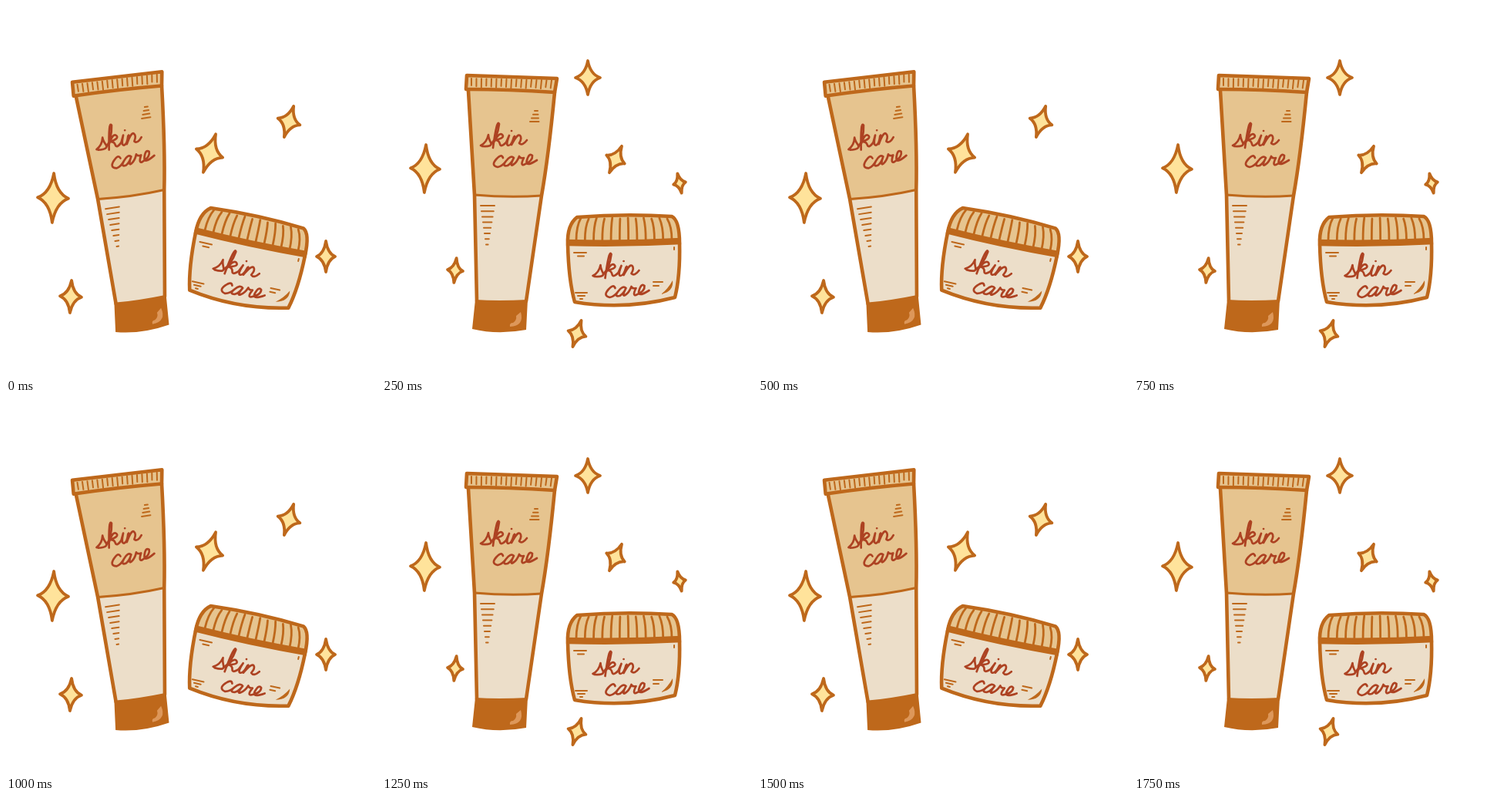
Recreate the animation shown at these times as an HTML page. Size 480 by 480 pixels, loop 2 s.

```html
<!DOCTYPE html>
<html lang="en">
<head>
<meta charset="utf-8">
<title>Skin care</title>
<style>
  html, body { margin: 0; width: 100%; height: 100%; overflow: hidden; background: #fff; }
  svg { display: block; width: 100%; height: 100%; }
  path { stroke-linecap: round; stroke-linejoin: round; }
  .tan { fill: #e6c48f; }
  .cream { fill: #ecdec9; }
  .cap { fill: #be681b; }
  .shine { fill: #dd975a; }
  .line { fill: none; stroke: #be681b; stroke-width: 4.6; }
  .thin { fill: none; stroke: #be681b; stroke-width: 2; }
  .ink { fill: none; stroke: #ad4222; stroke-width: 2.7; }
  .star { fill: #ffe39b; stroke: #be681b; stroke-width: 3.8; }
</style>
</head>
<body>
<svg viewBox="0 0 480 480">
  <defs>
    <!-- hand-lettered "skin care" -->
    <g id="label" class="ink" role="img" aria-label="skin care">
      <path d="M128 181Q136 177 138 167Q138 171 141 177T130 182
        M141 180Q150 170 152 153Q149 146 144 184M145 177Q152 163 156 167T147 174Q152 174 153 179T161 177
        L165 168Q160 181 164 181T171 170M168 162h.1M172 169L168 180Q176 165 179 168T178 178Q182 182 188 174"/>
      <path d="M157 197Q155 191 148 199T150 209Q156 208 161 201
        M171 197Q167 193 161 201T163 207Q168 204 171 197Q165 209 170 206T178 195
        Q179 198 184 197Q179 207 184 206Q196 201 195 194Q191 190 188 200T201 200"/>
    </g>
  </defs>

  <g id="tube">
    <path class="cream" d="M120 245L123 384H187L207 246Z"/>
    <path class="tan" d="M110 90L227 94L224 113L207 247H120L112 110Z"/>
    <path class="line" d="M109 108L110 90Q170 92 227 94L224 112Q216 195 207 246Q196 320 187 383M112 110L120 245L123 383"/>
    <path class="line" d="M110 108Q165 108 224 112"/>
    <path class="thin" style="stroke-width:3" d="M120 245Q165 249 207 246"/>
    <path id="crimp" class="thin"/>
    <path id="tubeMarks" class="thin"/>
    <path class="cap" d="M121 381Q150 383 189 381L187 420Q150 427 117 419Z"/>
    <path class="shine" d="M180 397Q185 415 166 416Q165 411 170 411Q175 408 174 402Z"/>
    <use href="#label"/>
  </g>

  <g id="jar">
    <path class="cream" d="M241 309Q242 355 250 384Q315 395 380 378Q387 350 386 308Z"/>
    <path class="tan" d="M241 306Q240 284 253 274Q315 269 376 273Q386 278 386 305Z"/>
    <path id="ridges" class="thin" style="stroke-width:2.8"/>
    <path class="line" d="M241 309Q240 284 253 274Q315 269 376 273Q386 278 386 308Q387 350 380 378Q315 395 250 384Q242 355 241 309"/>
    <path class="line" style="stroke-width:8.5;stroke-linecap:butt" d="M239 307Q315 309 388 305"/>
    <path id="jarMarks" class="thin"/>
    <path class="cap" d="M377 356Q379 370 362 374Q371 367 377 356Z"/>
    <use href="#label" x="145.5" y="169"/>
  </g>

  <g id="stars"></g>
</svg>
<script>
const $ = id => document.getElementById(id);
const strokes = (n, f) => Array.from({ length: n }, (_, i) => f(i)).join('');

// Stacked dashes whose start and width change evenly from row to row.
const hatch = (x, y, rows, width, shift, grow, gap) =>
  strokes(rows, i => `M${x + i * shift} ${y + i * gap}h${width + i * grow}`);

// Four-pointed star with concave sides.
function star(x, y, w, h, tilt) {
  const a = w * 0.2, b = h * 0.2;
  return `<path class="star" transform="translate(${x} ${y}) rotate(${tilt})"
    d="M0 ${-h}Q${a} ${-b} ${w} 0Q${a} ${b} 0 ${h}Q${-a} ${b} ${-w} 0Q${-a} ${-b} 0 ${-h}Z"/>`;
}

$('crimp').setAttribute('d', strokes(17, i =>
  `M${116 + i * 6.5} ${94 + i * 0.15}l${-i * 0.08} ${9 + i % 3}`));
$('ridges').setAttribute('d', strokes(12, i => {
  const u = i / 5.5 - 1, top = 314 + u * 56, end = 314 + u * 62;
  return `M${top} ${275 + i % 2}Q${end} 286 ${end} 304`;
}));
$('tubeMarks').setAttribute('d',
  hatch(128, 259, 8, 18, 1, -2.2, 7.2) + hatch(198, 136, 4, 4, -2, 2.5, 4.7));
$('jarMarks').setAttribute('d',
  hatch(249, 320, 2, 16, 5, -8, 4.5) + hatch(251, 372, 3, 15, 3, -6, 4) +
  hatch(352, 358, 2, 12, 0, -5, 5) + 'M379 313v3');

const poses = [
  {
    tube: 'translate(-36.2 26.2) rotate(-8.6)',
    jar: 'translate(-4.5 0) rotate(12.8 314.75 344)',
    stars: star(61, 249, 20, 32, 2) + star(84, 377, 14, 21, 3) + star(264, 191, 18, 26, 18) +
      star(367, 150, 15, 21, 17) + star(415, 325, 12, 20, 0)
  },
  {
    tube: '',
    jar: '',
    stars: star(56, 211, 19, 31, 2) + star(95, 343, 10, 16, 6) + star(267, 93, 16, 22, 0) +
      star(303, 199, 13, 19, 25) + star(386, 230, 8, 13, -12) + star(253, 425, 12, 18, 18)
  }
];

let shown;
function draw() {
  const pose = poses[Math.floor(performance.now() / 250) % 2];
  if (pose !== shown) {
    shown = pose;
    $('tube').setAttribute('transform', pose.tube);
    $('jar').setAttribute('transform', pose.jar);
    $('stars').innerHTML = pose.stars;
  }
  requestAnimationFrame(draw);
}
draw();
</script>
</body>
</html>
```
